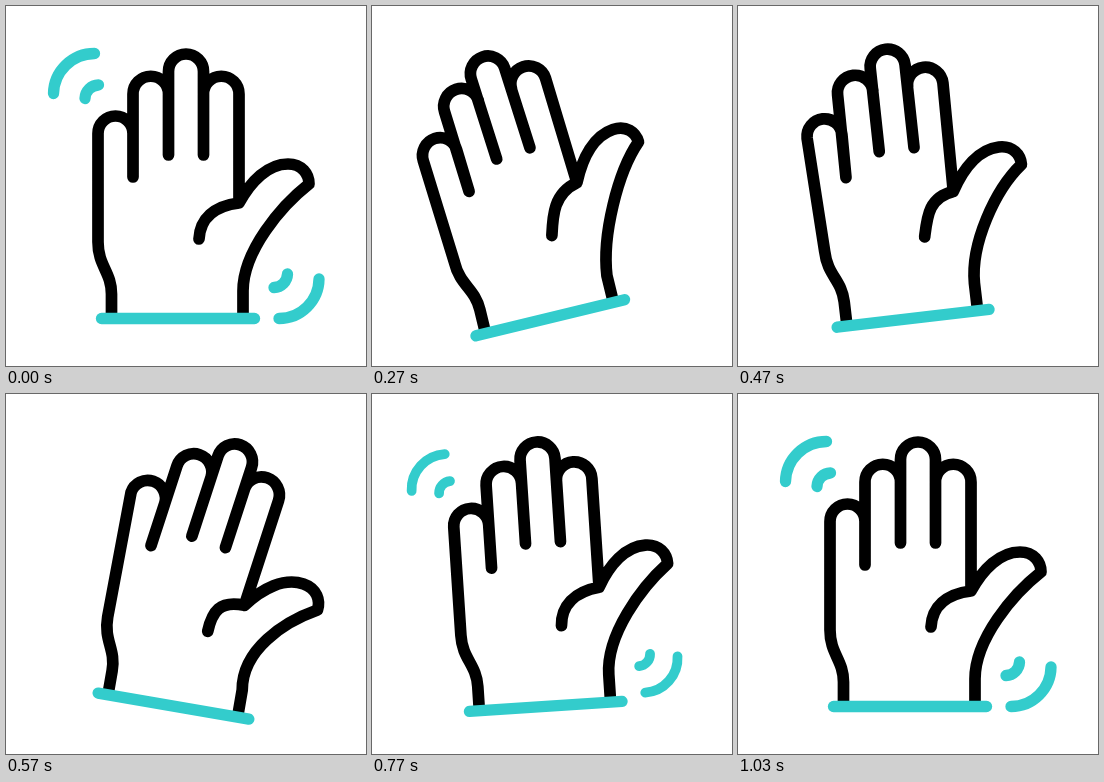
These frames come from a looping animation (360 by 360 pixels, 1670 ms). An HTML page:

```html
<!DOCTYPE html>
<html lang="en">
<head>
<meta charset="utf-8">
<title>Waving hand</title>
<style>
  html, body { margin: 0; width: 100%; height: 100%; overflow: hidden; background: #fff; }
  svg { display: block; width: 100%; height: 100%; }
</style>
</head>
<body>
<svg viewBox="0 0 360 360" fill="none" stroke-width="11.3" stroke-linecap="round" stroke-linejoin="round">
  <g id="wave">
    <path id="hand" stroke="#000" stroke-width="11.7"/>
    <g stroke="#33cccc">
      <path d="M95.5,312.5H248.5"/>
      <g id="upper"><path d="M47.5,87.5A41,41 0 0 1 88.5,47.5M79,92.5A14,14 0 0 1 92.5,79"/></g>
      <g id="lower"><path d="M313,273A40,40 0 0 1 273,312.5M281.5,268A14,14 0 0 1 268,281.5"/></g>
    </g>
  </g>
</svg>
<script>
const LOOP = 1670, FPS = 30, LAST = 31;
const [wave, hand, upper, lower] = ["wave", "hand", "upper", "lower"].map(id => document.getElementById(id));

// Keys are [frame, value] pairs, eased in and out between neighbours.
const TILT = [[4, 0], [10.4, -20], [11.4, -20], [17, 9.8], [24.3, -5], [LAST, 0]];
const BEND_LEFT = [[4, 0], [10.4, 1], [11.4, 1], [17, 0]];
const BEND_RIGHT = [[11.4, 0], [17, 1], [22.5, 0]];
const GROW = [[18, 0], [24.5, 1]];

function track(keys, frame) {
  if (frame <= keys[0][0]) return keys[0][1];
  for (let i = 1; i < keys.length; i++) {
    const [start, from] = keys[i - 1], [end, to] = keys[i];
    if (frame < end) {
      const t = (frame - start) / (end - start);
      return from + (to - from) * t * t * (3 - 2 * t);
    }
  }
  return keys[keys.length - 1][1];
}

// Half circle over a finger, from its left side to its right side.
function fingertip(left, right, y) {
  const r = (right - left) / 2, k = r * 0.552, mid = left + r;
  return `C${left},${y - k} ${mid - k},${y - r} ${mid},${y - r} ` +
    `C${mid + k},${y - r} ${right},${y - k} ${right},${y}`;
}

function handPath(left, right) {
  const swing = 7 * (left - right);
  const outline =
    `M105.5,311 L105.5,288 C105.5,266 92,260 92,236 L92,127.5 ${fingertip(92, 127, 127.5)} L127,171 ` +
    `M127,171 L127,88 ${fingertip(127, 162.5, 88)} ` +
    `M162.5,149 L162.5,65.5 ${fingertip(162.5, 197.5, 65.5)} L197.5,149 ` +
    `M197.5,88 ${fingertip(197.5, 233, 88)} L233,197 ` +
    `C245,175 262,158 282,158 C296,158 303,168 303,178 C275,200 ${237 + swing},245 237,285 L237,311 ` +
    `M233,197 C208,200 ${194 + 7 * left},213 193,233`;
  // Everything above the wrist and palm bends; the rest stays with the cuff.
  return outline.replace(/([\d.]+),([\d.]+)/g, (_, px, py) => {
    const x = +px, y = +py;
    if (y > 205) return `${x},${y}`;
    const dx = right * (140 - y) * 0.145 - left * (4.5 + 13.5 * ((205 - y) / 157) ** 1.5);
    const dy = right * (x - 207) * 0.16 - left * (x - 122) * 0.125;
    return `${(x + dx).toFixed(2)},${(y + dy).toFixed(2)}`;
  });
}

// Accents drift off while fading, then grow back from an origin near the hand.
function placeAccent(node, frame, driftX, driftY, originX, originY) {
  const leaving = frame < 8;
  const scale = leaving ? 1 : track(GROW, frame);
  const dx = leaving ? driftX * frame : originX * (1 - scale);
  const dy = leaving ? driftY * frame : originY * (1 - scale);
  node.setAttribute("transform", `translate(${dx} ${dy}) scale(${scale})`);
  node.setAttribute("opacity", leaving ? 1 - frame / 8 : +(scale > 0));
}

function render(ms) {
  const frame = Math.min(LAST, Math.floor((ms % LOOP + 5) * FPS / 1000));
  wave.setAttribute("transform", `rotate(${track(TILT, frame)} 172 286)`);
  hand.setAttribute("d", handPath(track(BEND_LEFT, frame), track(BEND_RIGHT, frame)));
  placeAccent(upper, frame, -3.4, -3, 83, 96);
  placeAccent(lower, frame, 4.4, 3.7, 267, 259);
}

const begin = performance.now();
function tick() {
  render(performance.now() - begin);
  requestAnimationFrame(tick);
}
tick();
</script>
</body>
</html>
```
